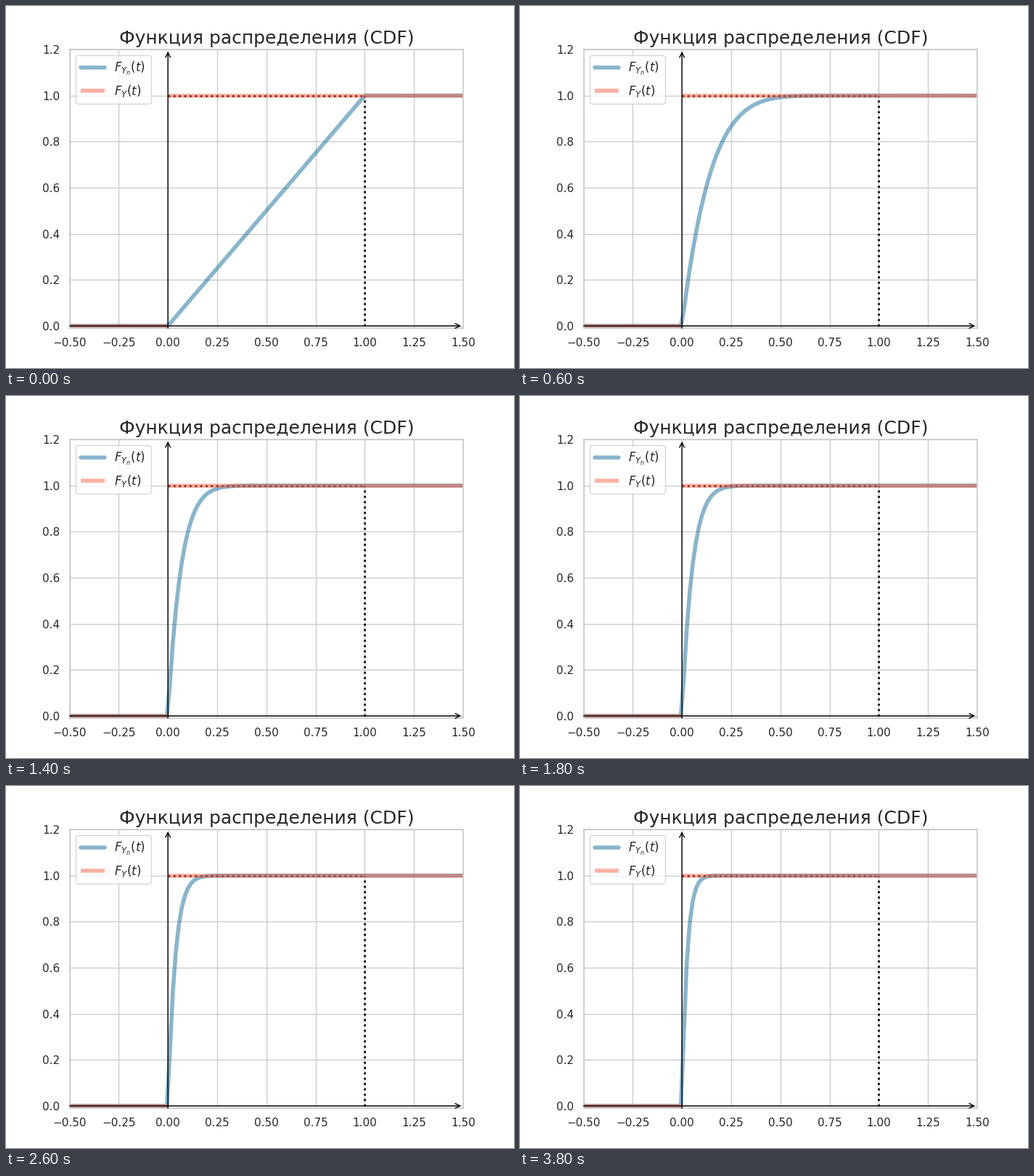
A matplotlib script that plays this animation: 700x500 px, repeating every 3900 ms.

```python
import numpy as np
import matplotlib.pyplot as plt
from matplotlib.animation import FuncAnimation
from matplotlib.patches import FancyBboxPatch

W, H, DPI = 700, 500, 100
FRAMES, INTERVAL = 39, 100
INK, GRID = "0.15", "0.8"
BLUE, RED = "#156c9b", "tomato"
THICK = dict(linewidth=4, alpha=0.5)

plt.rcParams.update({
    "font.family": "DejaVu Sans",
    "font.size": 12,
    "text.color": INK,
    "lines.solid_capstyle": "round",
})


def cdf_of_min(t, n):
    """CDF of the minimum of n uniform variables on [0, 1]."""
    return 1 - (1 - np.clip(t, 0, 1)) ** n


def axis_arrow(ax, start, tip):
    ax.annotate("", xy=tip, xytext=start,
                arrowprops=dict(arrowstyle="->", color="black",
                                linewidth=1, shrinkA=0, shrinkB=2))


def style_axes(ax):
    ax.set_xlim(-0.5, 1.5)
    ax.set_ylim(-0.01, 1.2)
    ax.set_xticks(np.arange(-0.5, 1.51, 0.25))
    ax.set_yticks(np.arange(0, 1.21, 0.2))
    ax.set_axisbelow(True)
    ax.grid(color=GRID, linewidth=1)
    ax.tick_params(length=0, pad=9.5, labelsize=11, labelcolor=INK)
    for spine in ax.spines.values():
        spine.set(color=GRID, linewidth=1.25)
    ax.set_title("Функция распределения (CDF)", fontsize=18, pad=6)


def draw_legend(fig):
    # Overlay measured in pixels from the top left corner
    layer = fig.add_axes([0, 0, 1, 1])
    layer.set(xlim=(0, W), ylim=(H, 0))
    layer.axis("off")
    box = FancyBboxPatch((95.8, 68.3), 103.8, 66.2,
                         boxstyle="round,pad=0,rounding_size=3.3",
                         facecolor="white", edgecolor=GRID,
                         linewidth=1, alpha=0.8, snap=True)
    layer.add_patch(box)
    rows = [(85, BLUE, "round", "$F_{Y_n}(t)$"),
            (117, RED, "butt", "$F_{Y}(t)$")]
    for y, color, cap, label in rows:
        layer.plot([102.5, 135.8], [y, y], color=color,
                   solid_capstyle=cap, **THICK)
        layer.text(149.2, y + 5.8, label, fontsize=12, va="baseline")


fig = plt.figure(figsize=(W / DPI, H / DPI), dpi=DPI, facecolor="white")
ax = fig.add_axes([0.125, 0.11, 0.775, 0.77])
style_axes(ax)

t = np.linspace(-1, 2, 200)
ax.hlines(1, 0, 1, colors="black", linestyles=":", linewidth=2)
ax.vlines(1, 0, 1, colors="black", linestyles=":", linewidth=2)
curve, = ax.plot(t, cdf_of_min(t, 1), color=BLUE, **THICK)
ax.hlines([0, 1], [-0.5, 0], [0, 1.5], colors=RED, **THICK)
axis_arrow(ax, (-0.5, 0), (1.5, 0))
axis_arrow(ax, (0, -0.01), (0, 1.2))
draw_legend(fig)


def update(frame):
    curve.set_ydata(cdf_of_min(t, frame + 1))
    return curve,


anim = FuncAnimation(fig, update, frames=FRAMES, interval=INTERVAL,
                     repeat=True, repeat_delay=0)
plt.show()
```
